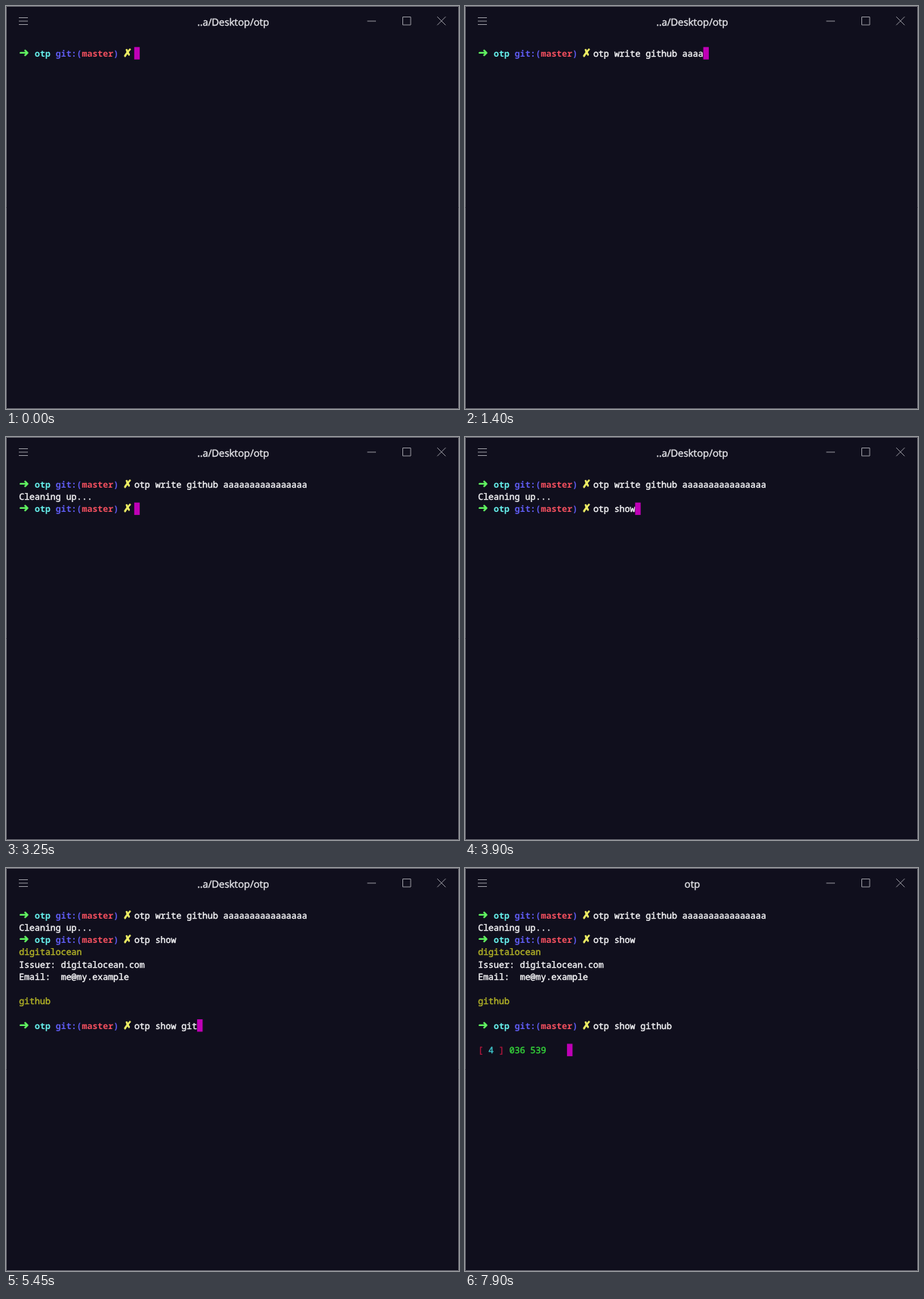
Animation, 600 px wide and 533 px high, one loop 8000 ms. Source, as an HTML page with a canvas:

```html
<!DOCTYPE html>
<html lang="en">
<head>
<meta charset="utf-8">
<style>
  html, body { margin: 0; width: 100%; height: 100%; overflow: hidden; background: #100f1d; }
  canvas { display: block; }
</style>
</head>
<body>
<canvas id="stage" width="600" height="533"></canvas>
<script>
const ctx = document.getElementById('stage').getContext('2d');
const LOOP = 8000, LEFT = 17.2, CELL = 6.942, ROW = 16.2;
const MONO = '11.57px "Noto Sans Mono", monospace';
const SYMBOL = '"DejaVu Sans", sans-serif';
const WHITE = '#f8f8fa', YELLOW = '#b4b427', GREY = '#96969e', RED = '#b0173c';

// Each command: row, text, time its prompt appears, typing keys as [ms, characters], enter time.
const commands = [
  { row: 0, text: 'otp write github aaaaaaaaaaaaaaaa', shown: 0, enter: 2950,
    keys: [[0, 0], [100, 0], [900, 10], [1400, 21], [2350, 29], [2800, 33]] },
  { row: 2, text: 'otp show', shown: 3200, enter: 4050,
    keys: [[3350, 0], [3850, 8]] },
  { row: 9, text: 'otp show github', shown: 4200, enter: 5700,
    keys: [[4800, 0], [5600, 15]] }
];

const output = [
  [3100, 1, 'Cleaning up...', WHITE],
  [4200, 3, 'digitalocean', YELLOW],
  [4200, 4, 'Issuer: digitalocean.com', WHITE],
  [4200, 5, 'Email:  me@my.example', WHITE],
  [4200, 7, 'github', YELLOW]
];

const COUNTER_START = 5850, FIRST_TICK = 6450, TICK = 550;

// A thin outline of the same colour gives the text its medium weight.
function label(text, x, y, color, font, weight) {
  ctx.font = font;
  ctx.fillStyle = ctx.strokeStyle = color;
  ctx.lineWidth = weight;
  ctx.fillText(text, x, y);
  if (weight) ctx.strokeText(text, x, y);
}

function put(text, col, row, color, font = MONO, weight = 0.4) {
  label(text, LEFT + col * CELL, 66.8 + row * ROW, color, font, weight);
}

function prompt(row) {
  const bold = (text, col, color) => put(text, col, row, color, 'bold ' + MONO, 0);
  put('➜', 0, row, '#62f562', '16px ' + SYMBOL, 0.3);
  bold('otp', 3, '#68f4f0');
  bold('git:(', 7, '#5f5cf2');
  bold('master', 12, '#f4505f');
  bold(')', 18, '#5f5cf2');
  put('✗', 19.9, row, '#f2f266', 'bold 14px ' + SYMBOL, 0.9);
}

function cursor(col, row) {
  ctx.fillStyle = '#bf00b6';
  ctx.fillRect(LEFT + col * CELL - 0.1, 54.3 + row * ROW, 7.3, 16.4);
}

function typed(keys, t) {
  let count = 0;
  keys.forEach(([time, chars], i) => {
    if (t < time) return;
    const next = keys[i + 1];
    count = next ? chars + (next[1] - chars) * Math.min(1, (t - time) / (next[0] - time)) : chars;
  });
  return Math.floor(count + 1e-6);
}

function windowFrame(title) {
  ctx.fillStyle = '#100f1d';
  ctx.fillRect(0, 0, 600, 533);
  ctx.lineWidth = 1;
  ctx.strokeStyle = '#6c6c75';
  ctx.strokeRect(0.5, 0.5, 599, 532);

  ctx.strokeStyle = GREY;
  ctx.beginPath();
  for (const y of [15.5, 20, 24.5]) {
    ctx.moveTo(17, y);
    ctx.lineTo(29, y);
  }
  ctx.moveTo(478.5, 20);
  ctx.lineTo(490, 20);
  ctx.rect(525.5, 14.5, 10.5, 10.5);
  ctx.moveTo(571.2, 14.2);
  ctx.lineTo(582.3, 25.3);
  ctx.moveTo(582.3, 14.2);
  ctx.lineTo(571.2, 25.3);
  ctx.stroke();

  ctx.textAlign = 'center';
  label(title, 301, 26.2, '#e6e6ea', '13.1px "Open Sans", sans-serif', 0.4);
  ctx.textAlign = 'left';
}

function draw(t) {
  const running = (t >= 2950 && t < 3200) || (t >= 4050 && t < 4200) || t >= 5700;
  windowFrame(running ? 'otp' : '..a/Desktop/otp');

  for (const [time, row, text, color] of output) {
    if (t >= time) put(text, 0, row, color);
  }

  let cursorAt;
  for (const { row, text, shown, enter, keys } of commands) {
    if (t < shown) continue;
    const count = typed(keys, t);
    prompt(row);
    put(text.slice(0, count), 22, row, WHITE);
    cursorAt = t < enter ? [22 + count, row] : [0, row + 1];
  }

  if (t >= COUNTER_START) {
    const left = 7 - Math.max(0, Math.floor((t - FIRST_TICK) / TICK) + 1);
    put('[', 0, 11, RED);
    put(String(left), 2, 11, '#3fcbd0');
    put(']', 4, 11, RED);
    put('036 539', 6, 11, '#35d93a');
    cursorAt = [17, 11];
  }
  cursor(...cursorAt);
}

ctx.textRendering = 'geometricPrecision';
ctx.lineJoin = 'round';
const start = performance.now();
function tick() {
  draw((performance.now() - start) % LOOP);
  requestAnimationFrame(tick);
}
tick();
</script>
</body>
</html>
```
